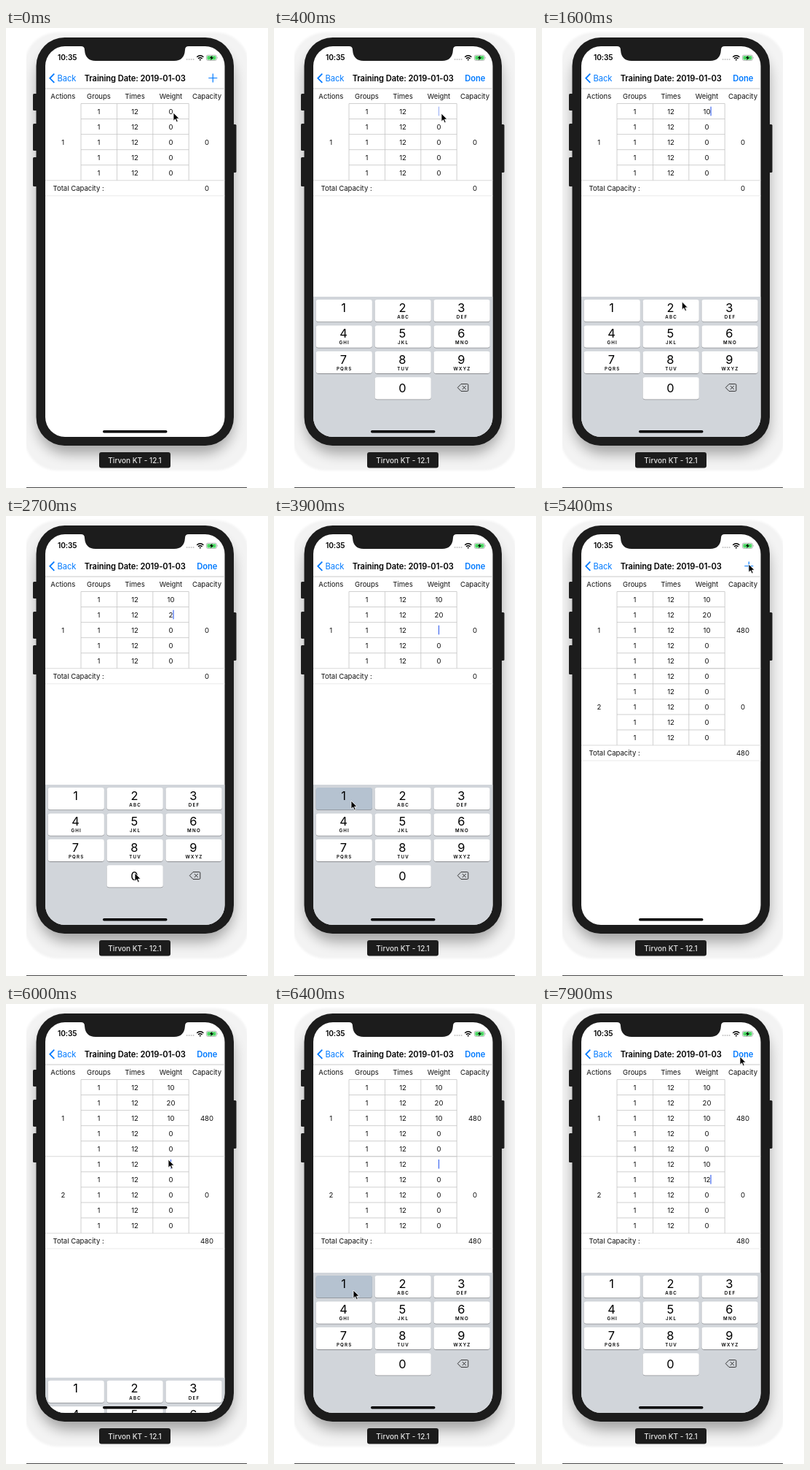
These frames come from a looping animation (360x630 px, 8000 ms). An HTML page:

```html
<!DOCTYPE html>
<html lang="en">
<head>
<meta charset="utf-8">
<title>Training log</title>
<style>
html, body { margin: 0; width: 100%; height: 100%; overflow: hidden; background: #fff; }
svg { display: block; width: 360px; height: 630px; font-family: Inter, "Liberation Sans", sans-serif; }
.mid { text-anchor: middle; }
.cell { font-size: 9.6px; fill: #111; letter-spacing: -.02px; }
.nav { font-size: 11.2px; letter-spacing: -.1px; }
.bold { font-weight: 600; }
.blue { fill: #007aff; }
.digit { font-size: 16.4px; text-anchor: middle; }
.letters { font-size: 6.2px; font-weight: 600; letter-spacing: 1.2px; text-anchor: middle; }
</style>
</head>
<body>
<svg id="stage" viewBox="0 0 360 630" xmlns="http://www.w3.org/2000/svg">
  <defs>
    <filter id="blur" x="-30%" y="-30%" width="160%" height="160%"><feGaussianBlur stdDeviation="9"/></filter>
    <filter id="soft"><feGaussianBlur stdDeviation="1.5"/></filter>
    <clipPath id="window"><rect x="28" y="4" width="303" height="604"/></clipPath>
    <clipPath id="screen"><rect x="54" y="25" width="246.5" height="535" rx="27"/></clipPath>
  </defs>
  <rect width="360" height="630" fill="#fff"/>
  <g clip-path="url(#window)">
    <rect x="25" y="6" width="309" height="600" rx="46" fill="#f3f3f3" filter="url(#soft)"/>
    <rect x="43" y="28" width="269" height="555" rx="42" fill="#000" opacity=".32" filter="url(#blur)"/>
  </g>
  <g fill="#1c1c1c">
    <rect x="37" y="90" width="7" height="23" rx="1.5"/>
    <rect x="37" y="131" width="7" height="37" rx="1.5"/>
    <rect x="37" y="177" width="7" height="40" rx="1.5"/>
    <rect x="310" y="132" width="6.5" height="66" rx="1.5"/>
    <rect x="41.5" y="13" width="271.5" height="559" rx="39"/>
  </g>
  <g clip-path="url(#screen)">
    <rect x="54" y="25" width="247" height="535" fill="#fff"/>
    <g id="table"></g>
    <g id="keyboard"></g>
    <path d="M103 25Q108 25 108 30Q109 45 123 45H231Q245 45 246 30Q246 25 251 25Z" fill="#1c1c1c"/>
    <rect x="133" y="551" width="88.5" height="3.4" rx="1.7" fill="#000"/>
  </g>
  <text x="71" y="44.3" class="bold" font-size="10.2" letter-spacing="-.1">10:35</text>
  <g fill="#c4c4c4">
    <circle cx="248.6" cy="43" r="1"/><circle cx="251.6" cy="43" r="1"/>
    <circle cx="254.6" cy="43" r="1"/><circle cx="257.6" cy="43" r="1"/>
  </g>
  <g fill="none" stroke="#000" stroke-width="1.5">
    <path d="M262.2 39.8Q266.8 35.8 271.4 39.8M264 41.9Q266.8 39.5 269.6 41.9"/>
    <path d="M265.4 43.3L266.8 44.8L268.2 43.3Q266.8 42.3 265.4 43.3Z" fill="#000" stroke="none"/>
  </g>
  <rect x="275.4" y="37.2" width="14" height="7.2" rx="2" fill="#fff" stroke="#999" stroke-width=".7"/>
  <rect x="276.4" y="38.2" width="12" height="5.2" rx="1.1" fill="#4cd964"/>
  <path d="M290.2 39.6Q291.6 40.8 290.2 42Z" fill="#999"/>
  <path d="M283.6 37.4L279.6 41.3H282.1L281.2 44.3L285.3 40.3H282.7Z" fill="#000"/>
  <path d="M66.3 62.7L60.3 68.8L66.3 74.9" fill="none" stroke="#007aff" stroke-width="1.8"/>
  <text x="70.5" y="72.9" class="nav blue">Back</text>
  <text x="177.2" y="72.9" class="nav bold mid">Training Date: 2019-01-03</text>
  <path id="plus" d="M278.3 68.5H290.3M284.3 62.5V74.5" stroke="#007aff" stroke-width="1.2"/>
  <text id="done" x="290.2" y="72.9" class="nav bold blue" text-anchor="end">Done</text>
  <rect x="128" y="581" width="98" height="21.5" rx="3" fill="#1c1c1c"/>
  <text x="177" y="595.5" class="mid" font-size="10" font-weight="500" fill="#e6e6e6">Tirvon KT - 12.1</text>
  <path d="M28 629.5H331" stroke="#4a4a4a"/>
  <path id="pointer" d="M0 0V11.2L2.6 8.8L4.4 12.8L6.2 12L4.5 8.1H8Z" fill="#000" stroke="#fff" stroke-width=".8"/>
</svg>
<script>
const LOOP = 8000;
const CELL_X = [78.3, 127.5, 177, 226.5, 276];
const ROW = 21.05, TOP = 103.5;
const FIRST_SUM = 4747, ADD_SECTION = 5400;
const KEYBOARD_HEIGHT = 192;

// time, x, y of the pointer tip
const PATH = [
  [0, 230, 116], [400, 230, 117], [750, 104, 390], [950, 104, 390],
  [1250, 176, 489], [1450, 176, 489], [1850, 227, 132], [2050, 227, 132],
  [2300, 178, 386], [2450, 178, 386], [2680, 177, 489], [2800, 177, 489],
  [3200, 228, 153], [3450, 228, 153], [3800, 106, 390], [3960, 106, 390],
  [4180, 177, 488], [4290, 177, 488], [4600, 271, 49], [4700, 269, 72],
  [4800, 269, 73], [5200, 284, 66], [5600, 284, 66], [5900, 223, 213],
  [6030, 223, 213], [6370, 109, 392], [6430, 109, 392], [6590, 177, 487],
  [6680, 177, 487], [6970, 226, 237], [7090, 226, 237], [7400, 140, 385],
  [7500, 122, 386], [7590, 165, 386], [7670, 168, 385], [7800, 274, 44], [7900, 272, 72]
];

// time, row, text: an empty text starts editing, row -1 ends it
const EDITS = [
  [40, 0, ""], [850, 0, "1"], [1350, 0, "10"],
  [1950, 1, ""], [2350, 1, "2"], [2770, 1, "20"],
  [3350, 2, ""], [3950, 2, "1"], [4250, 2, "10"], [FIRST_SUM, -1, ""],
  [5953, 5, ""], [6450, 5, "1"], [6650, 5, "10"],
  [7050, 6, ""], [7470, 6, "1"], [7650, 6, "12"]
];
const PRESS = 60;
const KEYBOARD_MOVES = [[40, 1], [FIRST_SUM, 0], [5953, 1]];

const $ = id => document.getElementById(id);
function add(parent, tag, attrs, text) {
  const node = document.createElementNS("http://www.w3.org/2000/svg", tag);
  for (const key in attrs) node.setAttribute(key, attrs[key]);
  if (text !== undefined) node.textContent = text;
  parent.appendChild(node);
  return node;
}
const label = (parent, x, y, text, cls = "cell mid") => add(parent, "text", { x, y, class: cls }, text);
const line = (parent, d, stroke) => add(parent, "path", { d, stroke, "stroke-width": .8 });
const show = (node, on) => node.setAttribute("visibility", on ? "visible" : "hidden");

const weights = [], capacities = [];
const table = $("table");
line(table, "M54 83H301", "#bdbdbd");
["Actions", "Groups", "Times", "Weight", "Capacity"].forEach((s, i) => label(table, CELL_X[i], 97.2, s));

function buildSection(n) {
  const g = add(table, "g", {});
  const top = TOP + n * 5 * ROW, bottom = top + 5 * ROW;
  for (let i = 0; i < 5; i++) {
    const y = top + i * ROW, base = y + 14;
    line(g, `M103 ${y}H251.2`, "#c4c4c4");
    label(g, CELL_X[1], base, "1");
    label(g, CELL_X[2], base, "12");
    weights.push(label(g, CELL_X[3], base, "0"));
  }
  for (const x of [103, 152.5, 201.8, 251.2]) line(g, `M${x} ${top}V${bottom}`, "#c4c4c4");
  line(g, `M54 ${bottom}H301`, "#d0d0d0");
  const middle = top + 2.5 * ROW + 3.5;
  label(g, CELL_X[0], middle, n + 1);
  capacities.push(label(g, CELL_X[4], middle, "0"));
  return g;
}
buildSection(0);
const second = buildSection(1);

const total = add(table, "g", {});
label(total, 64.5, TOP + 5 * ROW + 14.1, "Total Capacity :", "cell");
capacities.push(label(total, CELL_X[4], TOP + 5 * ROW + 14.1, "0"));
line(total, `M54 ${TOP + 6 * ROW}H301`, "#e4e4e4");
const caret = add(table, "rect", { width: 1.2, height: 12.6, fill: "#4269ef" });

const keyboard = $("keyboard"), keys = {};
add(keyboard, "rect", { x: 54, y: 368, width: 247, height: KEYBOARD_HEIGHT + 2, fill: "#d1d5da" });
function buildKey(digit, col, row, letters) {
  const x = 57.7 + col * 80.9, y = 372 + row * 35.4, cx = x + 38.6;
  const box = { x, y, width: 77.2, height: 30.3, rx: 3.3 };
  add(keyboard, "rect", { ...box, y: y + .8, fill: "#8b8d91" });
  keys[digit] = add(keyboard, "rect", { ...box, fill: "#fff" });
  label(keyboard, cx - .8, y + (digit ? 16.7 : 21), digit, "digit");
  label(keyboard, cx + .4, y + 25.9, letters, "letters");
}
["", "ABC", "DEF", "GHI", "JKL", "MNO", "PQRS", "TUV", "WXYZ"]
  .forEach((s, i) => buildKey(i + 1, i % 3, Math.floor(i / 3), s));
buildKey(0, 1, 3, "");
add(keyboard, "path", {
  d: "M252.3 492.5L257 487.6H265.6Q266.8 487.6 266.8 488.8V496.2Q266.8 497.4 265.6 497.4H257ZM258.8 490L263.8 495M263.8 490L258.8 495",
  fill: "none", stroke: "#222", "stroke-width": .9
});

// share of the way left, for a critically damped spring
function spring(ms) {
  const k = ms / 50;
  return Math.max(0, ((1 + k) * Math.exp(-k) - .007) / .993);
}

function keyboardOffset(t) {
  let move;
  for (const m of KEYBOARD_MOVES) if (t >= m[0]) move = m;
  if (!move) return KEYBOARD_HEIGHT;
  const left = spring(t - move[0]);
  return KEYBOARD_HEIGHT * (move[1] ? left : 1 - left);
}

function pointerAt(t) {
  const next = PATH.findIndex(p => p[0] > t);
  if (next < 0) return PATH[PATH.length - 1].slice(1);
  const [t0, x0, y0] = PATH[next - 1], [t1, x1, y1] = PATH[next];
  const u = (t - t0) / (t1 - t0), e = u * u * (3 - 2 * u);
  return [x0 + (x1 - x0) * e, y0 + (y1 - y0) * e];
}

function blink(ms) {
  const p = ms % 1000;
  if (p < 550) return 1;
  if (p < 700) return (700 - p) / 150;
  return p < 850 ? 0 : (p - 850) / 150;
}

function draw(t) {
  const texts = Array(10).fill("0");
  let active = -1, since = 0, pressed = "";
  for (const [at, row, text] of EDITS) {
    if (text && t >= at - PRESS && t < at) pressed = text.slice(-1);
    if (t < at) continue;
    active = row;
    since = at;
    if (row >= 0) texts[row] = text;
  }
  weights.forEach((w, i) => { if (w.textContent !== texts[i]) w.textContent = texts[i]; });
  for (const d in keys) keys[d].setAttribute("fill", d === pressed ? "#b5c2d0" : "#fff");

  const editing = active >= 0;
  show($("done"), editing);
  show($("plus"), !editing);
  show(caret, editing);
  if (editing) {
    const width = texts[active] ? weights[active].getComputedTextLength() : 0;
    caret.setAttribute("x", CELL_X[3] + width / 2 - (width ? 0 : .6));
    caret.setAttribute("y", TOP + active * ROW + 4.2);
    // the first caret appears part way through its blink
    caret.setAttribute("opacity", blink(t - since + (since === 40 ? 265 : 0)));
  }

  const sum = t >= FIRST_SUM ? "480" : "0";
  capacities[0].textContent = capacities[2].textContent = sum;
  const added = t >= ADD_SECTION;
  show(second, added);
  total.setAttribute("transform", `translate(0 ${added ? 5 * ROW : 0})`);
  keyboard.setAttribute("transform", `translate(0 ${keyboardOffset(t)})`);
  $("pointer").setAttribute("transform", `translate(${pointerAt(t)})`);
}

function tick() {
  draw(performance.now() % LOOP);
  requestAnimationFrame(tick);
}
tick();
</script>
</body>
</html>
```
